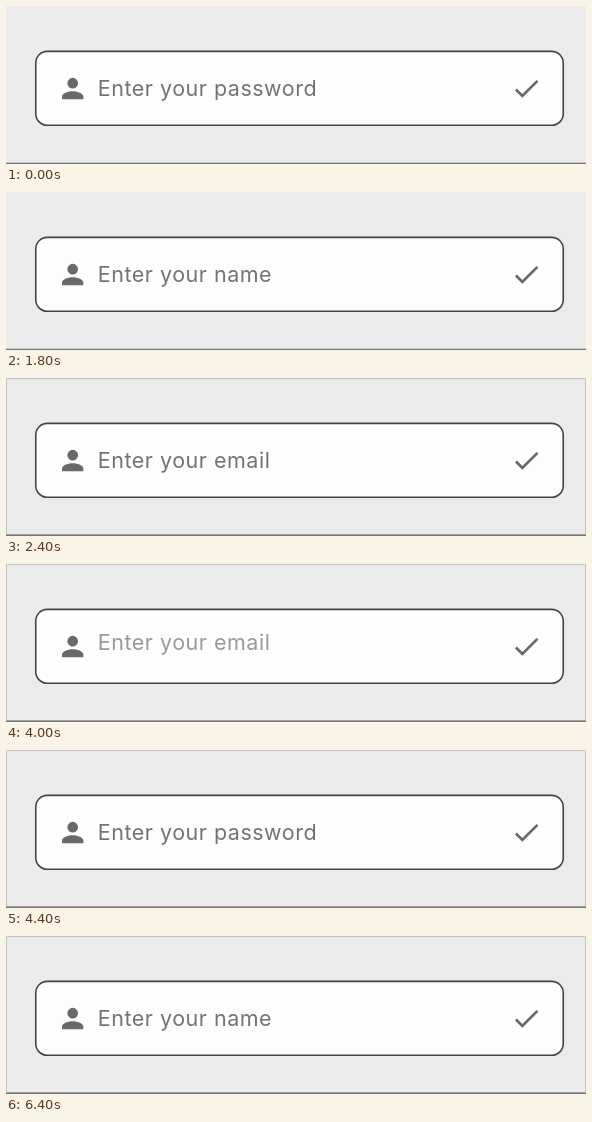
An HTML page for the animation above (7.1 s loop, 580 by 158 pixels).

```html
<!DOCTYPE html>
<html lang="en">
<head>
<meta charset="utf-8">
<title>Placeholder cycle</title>
<style>
  html, body { margin: 0; width: 100%; height: 100%; overflow: hidden; background: #ebebeb; }
  svg { display: block; }
  .icon { fill: #696969; }
  #hint {
    font: 400 21.5px Inter, Roboto, sans-serif;
    font-optical-sizing: none;
    letter-spacing: .51px;
    fill: #737373;
  }
</style>
</head>
<body>
<svg width="580" height="158" viewBox="0 0 580 158">
  <rect width="580" height="158" fill="#ebebeb"/>
  <g id="edgeThin">
    <rect y="156" width="580" height="1" fill="#c9c8c9"/>
    <rect y="157" width="580" height="1" fill="#757375"/>
  </g>
  <g id="edgeFull">
    <path d="M.5 158V.5H579.5V158" fill="none" stroke="#c2c2c2"/>
    <rect y="156" width="580" height="1" fill="#a19fa1"/>
    <rect y="157" width="580" height="1" fill="#757375"/>
  </g>
  <rect x="29.75" y="45.4" width="527.5" height="73.9" rx="11.5" fill="#fdfdfd" stroke="#444" stroke-width="1.6"/>
  <path class="icon" transform="translate(50.7 66.5) scale(1.333)"
    d="M12 12a4 4 0 1 0 0-8 4 4 0 0 0 0 8zm0 2c-2.67 0-8 1.34-8 4v2h16v-2c0-2.66-5.33-4-8-4z"/>
  <path class="icon" transform="translate(504.4 66.5) scale(1.333)"
    d="M9 16.17L4.83 12l-1.42 1.41L9 19 21 7l-1.41-1.41z"/>
  <text id="hint" x="91.8" y="90"></text>
</svg>
<script>
const LOOP = 7100, PERIOD = 2000, STEP = 100, TRAVEL = 15.5, FADE = 200, LEAD = 56;
const words = ['password', 'name', 'email'];
const $ = id => document.getElementById(id);
const hint = $('hint'), edgeThin = $('edgeThin'), edgeFull = $('edgeFull');

// The old text rises and fades for FADE ms, then the new one rises into place.
function pose(t) {
  const tick = Math.floor(t / STEP) * STEP;
  const turn = Math.floor(tick / PERIOD);
  if (tick === 0) return { word: words[0], y: 0, alpha: 1 };
  const p = Math.min((tick % PERIOD + LEAD) / FADE, 2);
  return p < 1
    ? { word: words[turn % 3], y: -TRAVEL * p, alpha: 1 - p }
    : { word: words[(turn + 1) % 3], y: TRAVEL * (2 - p), alpha: p - 1 };
}

function draw(now) {
  const t = now % LOOP;
  const { word, y, alpha } = pose(t);
  const label = 'Enter your ' + word;
  if (hint.textContent !== label) hint.textContent = label;
  hint.setAttribute('transform', `translate(0 ${y})`);
  hint.setAttribute('opacity', alpha);
  const framed = t >= PERIOD;
  edgeThin.setAttribute('visibility', framed ? 'hidden' : 'visible');
  edgeFull.setAttribute('visibility', framed ? 'visible' : 'hidden');
}

const start = performance.now();
function loop() {
  draw(performance.now() - start);
  requestAnimationFrame(loop);
}
loop();
</script>
</body>
</html>
```
